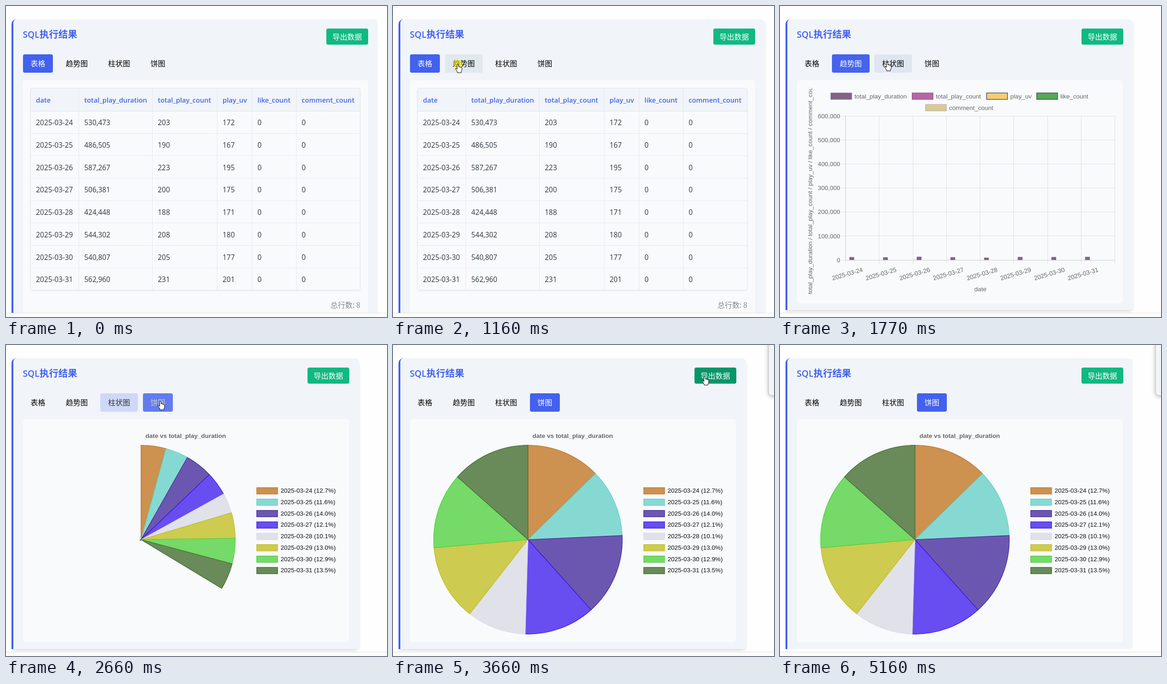
An HTML page with a canvas for the animation above (5.25 s loop, 829 by 676 pixels).

```html
<!DOCTYPE html>
<html lang="zh">
<head>
<meta charset="utf-8">
<title>SQL执行结果</title>
<style>
html, body { margin: 0; width: 829px; height: 676px; overflow: hidden; background: #fefefe; }
canvas { display: block; width: 829px; height: 676px; }
</style>
</head>
<body>
<canvas id="stage"></canvas>
<script>
const W = 829, H = 676, LOOP = 5250, STEP = 68;
const canvas = document.getElementById('stage');
const ctx = canvas.getContext('2d');
const dpr = window.devicePixelRatio || 1;
canvas.width = W * dpr;
canvas.height = H * dpr;

const CJK = '"Noto Sans CJK SC", "Noto Sans CJK", sans-serif';
const UI = '"Open Sans", "Noto Sans", sans-serif';
const CHART_FONT = '13.5px "Liberation Sans", Arial, sans-serif';
const BLUE = '#4361ee', CARD = '#f1f5f9', PANEL = '#f9fafc', LINE = '#e2e8f0';

// Moments at which each view opens
const LINE_AT = 1222, BAR_AT = 1765, PIE_AT = 2602, CHART_MS = 513;

const durations = [530473, 486505, 587267, 506381, 424448, 544302, 540807, 562960];
const counts = [203, 190, 223, 200, 188, 208, 205, 231];
const viewers = [172, 167, 195, 175, 171, 180, 177, 201];
const dates = durations.map((_, i) => '2025-03-' + (24 + i));
const total = durations.reduce((a, b) => a + b);
const columns = [
  ['date', 53], ['total_play_duration', 158], ['total_play_count', 318],
  ['play_uv', 459], ['like_count', 535], ['comment_count', 631]
];
const series = [
  { name: 'total_play_duration', fill: '#826482', edge: '#8a70ac', x: 110, y: 196, data: durations },
  { name: 'total_play_count', fill: '#b567a3', edge: '#92478f', x: 287, y: 196, data: counts },
  { name: 'play_uv', fill: '#f4cc73', edge: '#27304f', x: 449, y: 196, data: viewers },
  { name: 'like_count', fill: '#58a758', edge: '#1d3b45', x: 558, y: 196, data: durations.map(() => 0) },
  { name: 'comment_count', fill: '#dbc992', edge: '#b9b4b0', x: 316, y: 221, data: durations.map(() => 0) }
];
const pieColors = [
  ['#cd9150', '#bf6f1c'], ['#86d9d2', '#5ccfc5'], ['#6c57b0', '#3c1f98'], ['#684df0', '#3a10e6'],
  ['#e1e1ea', '#d8d8e4'], ['#cdcb50', '#bdbb1c'], ['#75da68', '#48cf37'], ['#698a59', '#39642a']
];

const PLAIN = [CARD, '#000000'], HOVER = [LINE, '#000000'], ACTIVE = [BLUE, '#ffffff'];
const tabs = [
  { label: '表格', x: 37, w: 65, states: [[-999, ACTIVE], [LINE_AT, PLAIN]] },
  { label: '趋势图', x: 113, w: 82, states: [[-999, PLAIN], [960, HOVER], [LINE_AT, ACTIVE], [BAR_AT, PLAIN]] },
  { label: '柱状图', x: 205, w: 82, states: [[-999, PLAIN], [1460, HOVER], [BAR_AT, ACTIVE], [PIE_AT, PLAIN]] },
  { label: '饼图', x: 298, w: 65, states: [[-999, PLAIN], [2070, HOVER], [PIE_AT, ACTIVE]] }
];
const exportStates = [[-999, ['#10b981', '#ffffff']], [3350, ['#059669', '#ffffff']], [4080, ['#10b981', '#ffffff']]];
const cardStates = [[-999, 0], [100, 1], [5000, 0]];

const pointerPath = [
  [60, 640, 690], [540, 410, 420], [610, 410, 420], [1020, 141, 126], [1230, 141, 126],
  [1560, 233, 122], [1836, 233, 122], [2170, 336, 122], [2860, 336, 122], [3180, 634, 104],
  [3250, 634, 104], [3450, 678, 68], [3860, 678, 68], [4340, 690, 128], [4670, 690, 128], [5150, 760, 690]
];
const presses = [[1150, LINE_AT], [1695, BAR_AT], [2510, PIE_AT], [3520, 3590]];

const ARROW = new Path2D('M0 0V16L3.7 12.5L6.4 18.5L8.8 17.4L6.2 11.6H11.3Z');
const HAND = new Path2D('M-1.5 1Q0 -1 1.5 1V6Q3.2 5 4 6.6Q5.7 5.8 6.5 7.5Q8.6 7 9 9V13Q9 15 7.5 16V19H-1V17L-5 11Q-5.5 8.6 -3.5 9.5L-1.5 11.5Z');

const clamp = v => Math.max(0, Math.min(1, v));
const smooth = k => k * k * (3 - 2 * k);
const outQuart = k => 1 - (1 - clamp(k)) ** 4;
const chartProgress = (t, start) => outQuart((t - start) / CHART_MS);

// CSS "ease", cubic-bezier(.25, .1, .25, 1), solved by bisection
function ease(x) {
  const bezier = (a, b, s) => 3 * a * s * (1 - s) ** 2 + 3 * b * s * s * (1 - s) + s ** 3;
  let low = 0, high = 1;
  for (let i = 0; i < 16; i++) {
    const mid = (low + high) / 2;
    if (bezier(.25, .25, mid) < x) low = mid; else high = mid;
  }
  return bezier(.1, 1, (low + high) / 2);
}

function mix(a, b, k) {
  const part = (hex, i) => parseInt(hex.slice(i, i + 2), 16);
  return 'rgb(' + [1, 3, 5].map(i => Math.round(part(a, i) + (part(b, i) - part(a, i)) * k)) + ')';
}

// Previous and current state with the progress of the 100 ms transition between them
function transition(states, t) {
  let i = states.length - 1;
  while (i > 0 && states[i][0] > t) i--;
  return [states[Math.max(0, i - 1)][1], states[i][1], ease(clamp((t - states[i][0]) / 100))];
}

function box(x, y, w, h, r, fill) {
  ctx.beginPath();
  ctx.roundRect(x, y, w, h, r);
  ctx.fillStyle = fill;
  ctx.fill();
}

function text(str, x, y, font, color, align = 'left') {
  ctx.font = font;
  ctx.fillStyle = color;
  ctx.textAlign = align;
  ctx.textBaseline = 'alphabetic';
  ctx.fillText(str, x, y);
}

const label = (str, x, y, align, color = '#666') => text(str, x, y + 4.7, CHART_FONT, color, align);

function segment(x1, y1, x2, y2, color = 'rgba(0,0,0,.1)') {
  ctx.beginPath();
  ctx.moveTo(x1, y1);
  ctx.lineTo(x2, y2);
  ctx.strokeStyle = color;
  ctx.lineWidth = 1;
  ctx.stroke();
}
const hLine = (x1, x2, y, color) => segment(x1, Math.floor(y) + .5, x2, Math.floor(y) + .5, color);
const vLine = (x, y1, y2, color) => segment(Math.floor(x) + .5, y1, Math.floor(x) + .5, y2, color);

function swatch(x, y, fill, edge) {
  ctx.fillStyle = fill;
  ctx.strokeStyle = edge;
  ctx.lineWidth = 1.15;
  ctx.fillRect(x, y - 7, 46, 14);
  ctx.strokeRect(x + .5, y - 7, 45.5, 14);
}

function button(x, y, w, h, str, states, t) {
  const [from, to, k] = transition(states, t);
  box(x, y, w, h, 4, mix(from[0], to[0], k));
  text(str, x + w / 2, y + h / 2 + 6.4, '16px ' + CJK, mix(from[1], to[1], k), 'center');
}

function drawCard(t, right, bottom) {
  const [from, to, k] = transition(cardStates, t);
  const lift = from + (to - from) * k;
  ctx.save();
  ctx.shadowColor = `rgba(0,0,0,${.14 * lift})`;
  ctx.shadowBlur = 6 * dpr;
  ctx.shadowOffsetY = 4 * dpr;
  box(15, 31, right - 16, bottom - 32, [10, 8, 8, 0], CARD);
  ctx.restore();
  box(12, 29, 30, bottom - 29, [10, 0, 0, 0], BLUE);
  box(16, 29, right - 16, bottom - 29, [7, 8, 8, 0], CARD);
  text('SQL', 36.5, 69, '600 19.3px ' + UI, BLUE);
  text('执行结果', 73, 69.3, 'bold 20.5px ' + CJK, BLUE);
  button(right - 112, 49, 91, 35, '导出数据', exportStates, t);
  for (const tab of tabs) button(tab.x, 105, tab.w, 40, tab.label, tab.states, t);
}

function drawTable(pointer) {
  const rowTop = i => 228.3 + i * 48.7;
  box(37, 161, 751, 530, 6, PANEL);
  ctx.save();
  ctx.shadowColor = 'rgba(0,0,0,.08)';
  ctx.shadowBlur = 3 * dpr;
  ctx.shadowOffsetY = dpr;
  box(53, 179, 718, 439, 4, PANEL);
  ctx.restore();
  box(53, 179, 718, 49, [4, 4, 0, 0], CARD);
  const hovered = Math.floor((pointer.y - rowTop(0)) / 48.7);
  if (hovered >= 0 && hovered < 8) {
    ctx.fillStyle = '#f3f6fb';
    ctx.fillRect(53, rowTop(hovered), 718, 48.7);
  }
  ctx.strokeStyle = LINE;
  ctx.lineWidth = 1;
  ctx.beginPath();
  ctx.roundRect(53.5, 178.5, 717, 439, 4);
  ctx.stroke();
  for (let i = 0; i < 8; i++) hLine(53, 771, rowTop(i), i ? LINE : '#dbe2ec');
  columns.forEach(([name, x], c) => {
    if (c) vLine(x, 179, 618, LINE);
    text(name, x + 12.3, 210, '600 14.7px ' + UI, BLUE);
    dates.forEach((date, i) => {
      const value = c ? series[c - 1].data[i].toLocaleString('en-US') : date;
      text(value, x + 12.3, 259.3 + i * 48.7, '15.4px ' + UI, '#2d3640');
    });
  });
  text('总行数: 8', 771, 655.5, '16px ' + CJK, '#7f8c8d', 'right');
}

function drawAxes(bottom, right, gaps) {
  const gap = (right - 143) / gaps;
  for (const s of series) {
    swatch(s.x, s.y, s.fill, s.edge);
    label(s.name, s.x + 52, s.y);
  }
  for (let i = 0; i <= 6; i++) {
    const y = bottom - i * (bottom - 239) / 6;
    hLine(135, right, y);
    label((i * 100000).toLocaleString('en-US'), 131, y, 'right');
  }
  for (let i = 0; i <= gaps; i++) vLine(142.5 + i * gap, 239, bottom + 8);
  hLine(143, right, bottom);
  vLine(142.5, 239, bottom);
  label('date', 436, 615.5, 'center');
  ctx.save();
  ctx.beginPath();
  ctx.rect(53, 178.5, 677, 451.5);
  ctx.clip();
  ctx.translate(65, (239 + bottom) / 2);
  ctx.rotate(-Math.PI / 2);
  label(series.map(s => s.name).join(' / '), 0, 0, 'center');
  ctx.restore();
  return gap;
}

function drawLineChart(grow) {
  const bottom = 571, gap = drawAxes(bottom, 693, 7);
  dates.forEach((d, i) => label(d, 143 + i * gap, 588, 'center'));
  for (const s of [...series].reverse()) {
    const points = s.data.map((v, i) => [143 + i * gap, bottom - v / 600000 * 332 * grow]);
    ctx.strokeStyle = s.edge;
    ctx.fillStyle = s.fill;
    ctx.lineWidth = 2;
    ctx.beginPath();
    points.forEach(p => ctx.lineTo(...p));
    ctx.stroke();
    ctx.lineWidth = 1;
    for (const [x, y] of points) {
      ctx.beginPath();
      ctx.arc(x, y, 3.4, 0, 7);
      ctx.fill();
      ctx.stroke();
    }
  }
}

function drawBarChart(grow) {
  const bottom = 552, gap = drawAxes(bottom, 729, 8);
  dates.forEach((d, i) => {
    ctx.save();
    ctx.translate(179.6 + i * gap, 572.5);
    ctx.rotate(-16.5 * Math.PI / 180);
    label(d, 0, 0, 'right');
    ctx.restore();
  });
  series.forEach((s, n) => s.data.forEach((v, i) => {
    const h = v / 600000 * 313 * grow;
    if (h < .02) return;
    const x = 143 + i * gap + gap * .1 + n * gap * .16 + .6, w = gap * .144;
    ctx.fillStyle = s.edge;
    ctx.fillRect(x, bottom - h, w, h);
    ctx.fillStyle = s.fill;
    if (h > 1.1) ctx.fillRect(x + 1.1, bottom - h + 1.1, w - 2.2, h - 1.1);
  }));
}

function drawPie(grow) {
  text('date vs total_play_duration', 391, 202.3, 'bold ' + CHART_FONT, '#666', 'center');
  let angle = -Math.PI / 2;
  durations.forEach((v, i) => {
    const [fill, edge] = pieColors[i];
    const end = angle + v / total * Math.PI * 2 * grow;
    ctx.beginPath();
    ctx.moveTo(293.7, 423);
    ctx.arc(293.7, 423, 205.3, angle, end);
    ctx.closePath();
    ctx.fillStyle = fill;
    ctx.fill();
    ctx.strokeStyle = edge;
    ctx.lineWidth = 1.15;
    ctx.stroke();
    angle = end;
    const y = 317 + i * 24.75;
    swatch(545, y, fill, edge);
    label(`${dates[i]} (${(v / total * 100).toFixed(1)}%)`, 597.5, y - .5, 'left', '#111');
  });
}

function drawSidePopup() {
  ctx.save();
  ctx.shadowColor = 'rgba(0,0,0,.3)';
  ctx.shadowBlur = 10 * dpr;
  ctx.shadowOffsetY = 2 * dpr;
  box(817, -20, 40, 130, 8, '#f3f4f6');
  ctx.restore();
  ctx.strokeStyle = '#b9bcc0';
  ctx.lineWidth = 1;
  ctx.stroke();
}

function pointerAt(t) {
  const next = pointerPath.findIndex(p => p[0] > t);
  if (next < 1) {
    const [, x, y] = pointerPath[next < 0 ? pointerPath.length - 1 : 0];
    return { x, y };
  }
  const [t0, x0, y0] = pointerPath[next - 1], [t1, x1, y1] = pointerPath[next];
  const k = smooth((t - t0) / (t1 - t0));
  return { x: x0 + (x1 - x0) * k, y: y0 + (y1 - y0) * k };
}

function drawPointer({ x, y }, t, right) {
  const inside = (l, top, w, h) => x >= l && x <= l + w && y >= top && y <= top + h;
  const clickable = tabs.some(tab => inside(tab.x, 105, tab.w, 40)) || inside(right - 112, 49, 91, 35);
  if (presses.some(([from, to]) => t >= from && t < to)) {
    ctx.beginPath();
    ctx.arc(x, y, 10.5, 0, 7);
    ctx.fillStyle = 'rgba(255,242,0,.55)';
    ctx.fill();
  }
  ctx.save();
  ctx.translate(x, y);
  ctx.fillStyle = '#fff';
  ctx.strokeStyle = '#000';
  ctx.lineWidth = 1;
  const shape = clickable ? HAND : ARROW;
  ctx.fill(shape);
  ctx.stroke(shape);
  ctx.restore();
}

function draw(t) {
  const charting = t >= LINE_AT;
  const right = charting ? 768 : 809, bottom = charting ? 661 : 700;
  const pointer = pointerAt(t);
  ctx.setTransform(dpr, 0, 0, dpr, 0, 0);
  ctx.fillStyle = '#fefefe';
  ctx.fillRect(0, 0, W, H);
  drawCard(t, right, bottom);
  if (!charting) drawTable(pointer);
  else {
    box(37, 161, 709, 485, 6, PANEL);
    if (t >= PIE_AT) drawPie(chartProgress(t, PIE_AT));
    else if (t >= BAR_AT) drawBarChart(chartProgress(t, BAR_AT));
    else drawLineChart(chartProgress(t, LINE_AT));
  }
  ctx.fillStyle = '#fcfcfd';
  ctx.fillRect(0, 667, W, 9);
  hLine(0, W, 667, '#e1e4e8');
  if (t >= 3590) drawSidePopup();
  drawPointer(pointer, t, right);
}

function frame(now) {
  draw(Math.floor((now % LOOP + 12) / STEP) * STEP);
  requestAnimationFrame(frame);
}
requestAnimationFrame(frame);
</script>
</body>
</html>
```
